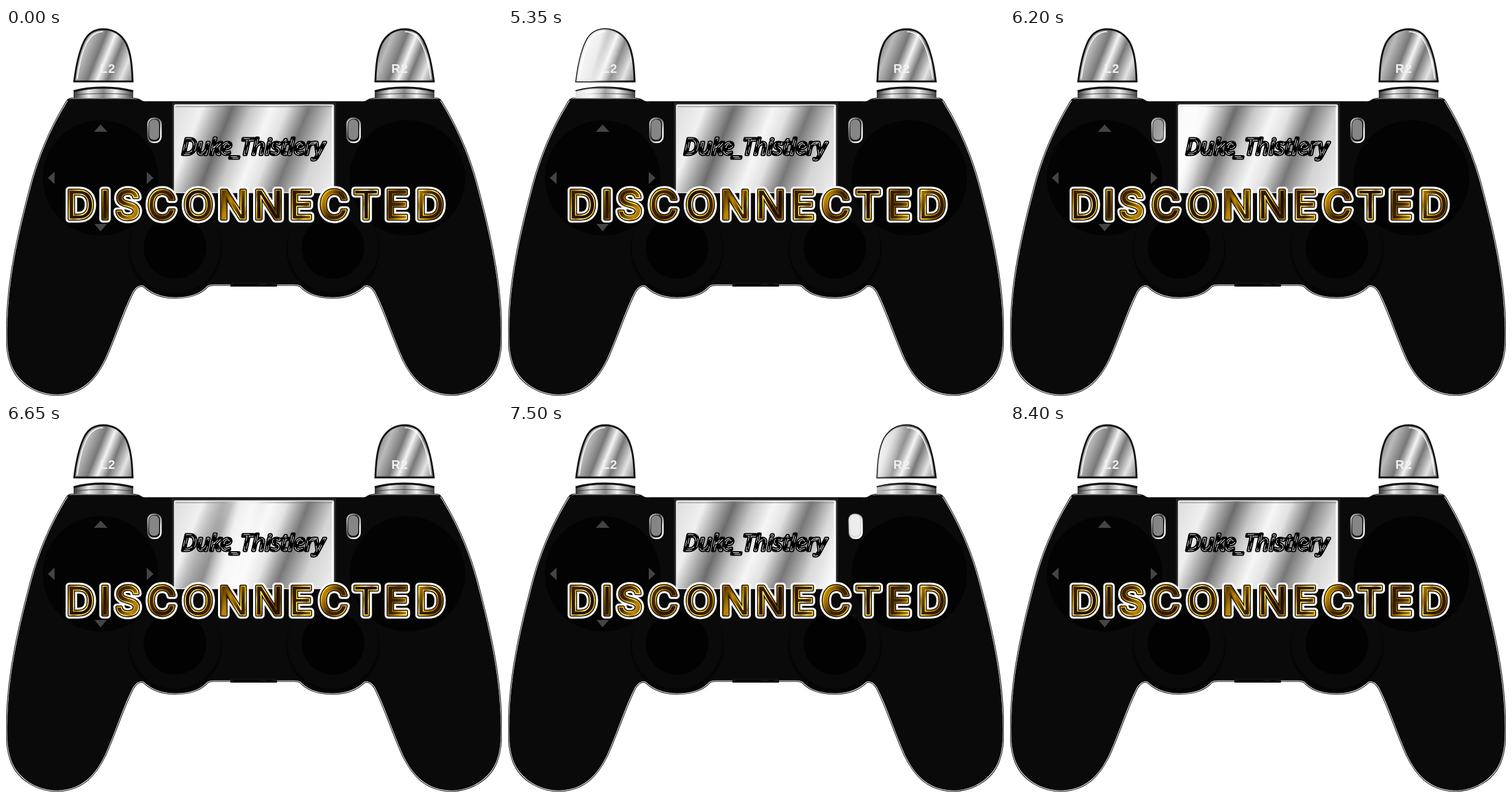
An HTML page that plays this animation: 807x599 px, repeating every 8.5 s.

```html
<!DOCTYPE html>
<html lang="en">
<head>
<meta charset="utf-8">
<title>Controller</title>
<style>
  html, body { margin: 0; width: 100%; height: 100%; overflow: hidden; background: #fff; }
  svg { display: block; }
  .trigger { font: bold 20px "Liberation Sans", Arial, sans-serif; letter-spacing: 1px; fill: #f2f2f2; }
  .name { font: italic 37px "Open Sans", sans-serif; text-anchor: middle; }
  .title { font: 500 65px Inter, sans-serif; text-anchor: middle; stroke-linejoin: round; }
</style>
</head>
<body>
<svg width="807" height="599" viewBox="0 0 807 599">
  <defs>
    <linearGradient id="steel" gradientUnits="userSpaceOnUse" x1="275" y1="122" x2="551" y2="232">
      <stop offset="0" stop-color="#ddd"/>
      <stop offset=".15" stop-color="#f0f0f0"/>
      <stop offset=".3" stop-color="#6c6c6c"/>
      <stop offset=".4" stop-color="#c8c8c8"/>
      <stop offset=".5" stop-color="#f6f6f6"/>
      <stop offset=".58" stop-color="#e2e2e2"/>
      <stop offset=".69" stop-color="#777"/>
      <stop offset=".82" stop-color="#d4d4d4"/>
      <stop offset="1" stop-color="#f2f2f2"/>
    </linearGradient>
    <linearGradient id="steelL" gradientUnits="userSpaceOnUse" x1="112" y1="0" x2="224" y2="45">
      <stop offset="0" stop-color="#444"/>
      <stop offset=".24" stop-color="#bbb"/>
      <stop offset=".42" stop-color="#777"/>
      <stop offset=".54" stop-color="#f4f4f4"/>
      <stop offset=".67" stop-color="#777"/>
      <stop offset=".83" stop-color="#e4e4e4"/>
      <stop offset="1" stop-color="#777"/>
    </linearGradient>
    <linearGradient id="steelR" href="#steelL" gradientTransform="translate(490 0)"/>
    <linearGradient id="strip" x2="1" y2="0">
      <stop offset="0" stop-color="#333"/>
      <stop offset=".25" stop-color="#eee"/>
      <stop offset=".5" stop-color="#888"/>
      <stop offset=".7" stop-color="#f2f2f2"/>
      <stop offset="1" stop-color="#444"/>
    </linearGradient>
    <linearGradient id="bevel" x2="1" y2="1">
      <stop offset="0" stop-color="#ddd"/>
      <stop offset=".4" stop-color="#555"/>
      <stop offset=".75" stop-color="#fff"/>
    </linearGradient>
    <linearGradient id="gold" gradientUnits="userSpaceOnUse" x1="0" y1="264" x2="34" y2="284" spreadMethod="reflect">
      <stop offset="0" stop-color="#5e3c00"/>
      <stop offset=".35" stop-color="#b87a06"/>
      <stop offset=".6" stop-color="#ffd51f"/>
      <stop offset=".8" stop-color="#fff09a"/>
      <stop offset="1" stop-color="#c28a0a"/>
    </linearGradient>
    <linearGradient id="amber" gradientUnits="userSpaceOnUse" x1="0" y1="264" x2="62" y2="292" spreadMethod="reflect">
      <stop offset="0" stop-color="#1c0e00"/>
      <stop offset=".7" stop-color="#3c2400"/>
      <stop offset="1" stop-color="#c08a00"/>
    </linearGradient>
    <linearGradient id="shine">
      <stop offset="0" stop-color="#fff" stop-opacity="0"/>
      <stop offset=".22" stop-color="#fff" stop-opacity=".25"/>
      <stop offset=".42" stop-color="#fff" stop-opacity=".85"/>
      <stop offset=".58" stop-color="#fff" stop-opacity=".85"/>
      <stop offset=".78" stop-color="#fff" stop-opacity=".25"/>
      <stop offset="1" stop-color="#fff" stop-opacity="0"/>
    </linearGradient>

    <path id="half" d="M404 122H230Q222 123 218 119Q214 116 205 116H106Q101 117 97 125C70 170 52 215 40 262C22 330 6 400 3 470C1 505 2 530 10 550C22 580 55 597 85 596C125 594 145 570 160 540C178 500 190 460 206 429Q214 416 224 419C236 431 254 438 275 438C298 438 315 433 328 419Q332 417 338 417H404"/>
    <g id="body"><use href="#half"/><use href="#half" transform="matrix(-1 0 0 1 807 0)"/></g>

    <path id="cap" d="M111 87C114 62 118 42 126 24C133 8 144 2 158 2C174 2 187 10 195 24C203 40 205 60 206 87Z"/>
    <path id="capR" d="M696 87C693 62 689 42 681 24C674 8 663 2 649 2C633 2 620 10 612 24C604 40 602 60 601 87Z"/>
    <path id="collar" d="M110 114V103C124 99 140 97 158 97C176 97 192 99 207 103V114Z"/>
    <rect id="pad" x="274" y="125" width="259" height="143" rx="2"/>
    <rect id="key" x="231" y="147" width="21" height="39" rx="9"/>

    <clipPath id="metal">
      <use href="#cap"/><use href="#capR"/>
      <use href="#collar"/><use href="#collar" x="490"/>
      <use href="#pad"/>
      <use href="#key"/><use href="#key" x="324"/>
    </clipPath>

    <g id="side">
      <circle cx="154" cy="244" r="94" fill="#030303"/>
      <circle cx="275" cy="361" r="76" fill="#050505"/>
      <circle cx="275" cy="357" r="74" fill="#0a0a0a"/>
      <circle cx="275" cy="357" r="51" fill="#020202"/>
    </g>
    <text id="title" y="310.5" x="121 161 198 253 313 370 427 480 533 586 636 690">DISCONNECTED</text>
    <text id="name" x="402" y="206">Duke_Thistlery</text>
  </defs>

  <!-- shell -->
  <g stroke-linejoin="round">
    <use href="#body" fill="none" stroke="#000" stroke-width="5"/>
    <use href="#body" fill="none" stroke="#fff" stroke-width="3"/>
    <use href="#body" fill="#0a0a0a" stroke="#0a0a0a"/>
  </g>
  <path d="M100 117H215L222 121H585L592 117H707" fill="none" stroke="#0a0a0a" stroke-width="3"/>
  <use href="#side"/>
  <use href="#side" transform="matrix(-1 0 0 1 807 0)"/>
  <path fill="#444" d="M154 157l11 12h-22zM154 331l10-12h-20zM68 244l11-10v20zM240 244l-11-10v20z"/>
  <rect x="365" y="414" width="76" height="7" rx="1" fill="#111"/>
  <path d="M370 418H412M424 418H432" stroke="#000" stroke-width="3"/>

  <!-- metal parts -->
  <g stroke="#111" stroke-width="3">
    <use href="#cap" fill="url(#steelL)"/>
    <use href="#capR" fill="url(#steelR)"/>
  </g>
  <g fill="none" stroke="#fff" stroke-width="1.5">
    <path d="M116 83C119 60 123 42 130 27C137 12 146 6 158 6"/>
    <path d="M691 83C688 60 684 42 677 27C670 12 661 6 649 6"/>
  </g>
  <g id="ring">
    <use href="#collar" fill="url(#strip)"/>
    <path d="M110 103C124 99 140 97 158 97S192 99 207 103" fill="none" stroke="#111" stroke-width="3.5"/>
    <path d="M110 109Q158 104 207 109" fill="none" stroke="#444"/>
  </g>
  <use href="#ring" x="490"/>
  <path d="M270 121H537V268H270Z" fill="#222"/>
  <use href="#pad" fill="url(#steel)" stroke="#eee" stroke-width="1.5"/>
  <path d="M531 127V266" stroke="#fff" stroke-width="2"/>
  <path d="M276 128H531" stroke="#777"/>
  <g id="button">
    <use href="#key" fill="#111" stroke="url(#bevel)" stroke-width="2.5"/>
    <rect x="233" y="149" width="16" height="33" rx="7" fill="#858585"/>
  </g>
  <use href="#button" x="324"/>

  <g clip-path="url(#metal)">
    <rect id="glint" x="-70" y="-130" width="140" height="300" fill="url(#shine)"/>
  </g>

  <!-- lettering -->
  <text class="trigger" x="153" y="73">L2</text>
  <text class="trigger" x="627" y="73">R2</text>
  <g class="name" stroke-linejoin="round">
    <use href="#name" stroke="#000" stroke-width="5"/>
    <use href="#name" stroke="#fff" stroke-width=".9" stroke-dasharray="10 9"/>
  </g>
  <g class="title">
    <use href="#title" stroke="#fff" stroke-width="11.5"/>
    <use href="#title" stroke="#180c00" stroke-width="4.8"/>
    <use href="#title" fill="url(#amber)" stroke="url(#gold)" stroke-width="1.8"/>
  </g>
</svg>
<script>
  const LOOP = 8500, START = 5000, END = 8400, STEP = 50;
  const SPEED = 0.216; // px per ms
  const glint = document.getElementById("glint");

  function draw() {
    const t = Math.floor(performance.now() % LOOP / STEP) * STEP;
    const x = 38 + (t - START) * SPEED;
    glint.setAttribute("visibility", t >= START && t < END ? "visible" : "hidden");
    glint.setAttribute("transform", `translate(${x} 118) skewX(-14)`);
    requestAnimationFrame(draw);
  }
  draw();
</script>
</body>
</html>
```
